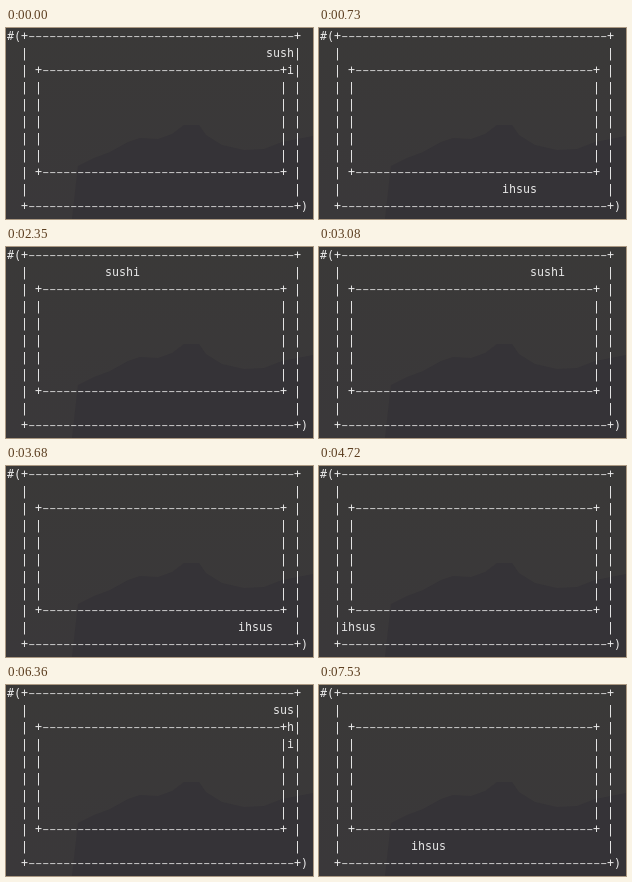
These frames come from a looping animation (307x191 px, 7830 ms). An HTML page:

```html
<!DOCTYPE html>
<html lang="en">
<head>
<meta charset="utf-8">
<title>Sushi belt</title>
<style>
html, body { margin: 0; width: 100%; height: 100%; overflow: hidden; background: #3a3839; }
svg { display: block; width: 100%; height: 100%; }
text { font: 11.63px "DejaVu Sans Mono", monospace; fill: #e8e8e8; text-anchor: middle; }
text.dash { font-size: 10px; }
</style>
</head>
<body>
<svg id="stage" viewBox="0 0 307 191">
  <defs>
    <linearGradient id="sky" x2="0" y2="1">
      <stop offset="0" stop-color="#3a3938"/>
      <stop offset="1" stop-color="#3a383a"/>
    </linearGradient>
  </defs>
  <rect width="307" height="191" fill="url(#sky)"/>
  <path fill="#353337" d="M66 191 72 138 88 130 104 124 122 114 134 110 152 111 166 106 178 97 193 97 200 107 216 117 238 122 258 121 276 114 307 108V191Z"/>
</svg>
<script>
const CELL_W = 7, CELL_H = 17;
const WORD = 'sushi';
const LOOP = 7830;
const RING = 90;
const stage = document.getElementById('stage');

const cellX = col => 4.5 + CELL_W * col;
const baseline = row => 12 + CELL_H * row;

function addText(string, cols, y, className = '') {
  const el = document.createElementNS('http://www.w3.org/2000/svg', 'text');
  el.setAttribute('x', cols.map(cellX).join(' '));
  el.setAttribute('y', y);
  el.setAttribute('class', className);
  el.textContent = string;
  stage.append(el);
  return el;
}

function drawBox(left, top, right, bottom) {
  const inner = Array.from({ length: right - left - 1 }, (_, i) => left + 1 + i);
  for (const row of [top, bottom]) {
    addText('++', [left, right], baseline(row));
    addText('\u2212'.repeat(inner.length), inner, baseline(row) - 0.36, 'dash');
  }
  for (let row = top + 1; row < bottom; row++) {
    addText('||', [left, right], baseline(row) - 0.5);
  }
}

// Clockwise walk through the corridor between the two boxes.
function cellAt(index) {
  const p = index % RING;
  if (p < 38) return [3 + p, 1];
  if (p < 45) return [40, p - 36];
  if (p < 83) return [85 - p, 9];
  return [3, 91 - p];
}

// [step, start in ms, cell of the first letter]
const KEYS = [
  [0, 0, 34], [1, 140, 38], [8, 1180, 67], [9, 1320, 72], [16, 2350, 101],
  [17, 2500, 105], [24, 3530, 134], [25, 3680, 138], [32, 4720, 168],
  [33, 4870, 172], [40, 5910, 202], [41, 6060, 206], [43, 6360, 215],
  [48, 7090, 236], [49, 7240, 240], [51, 7530, 248]
];

const steps = [];
KEYS.slice(1).forEach(([end, endTime, endCell], i) => {
  const [start, time, cell] = KEYS[i];
  for (let n = start; n < end; n++) {
    const k = (n - start) / (end - start);
    steps.push({
      time: Math.round((time + (endTime - time) * k) / 10) * 10,
      cell: Math.round(cell + (endCell - cell) * k)
    });
  }
});
const [, lastTime, lastCell] = KEYS[KEYS.length - 1];
steps.push({ time: lastTime, cell: lastCell });

addText('#(', [0, 1], baseline(0));
addText(')', [42], baseline(10));
drawBox(2, 0, 41, 10);
drawBox(4, 2, 39, 8);
const letters = [...WORD].map(char => addText(char, [0], 0));

function render(ms) {
  const t = ms % LOOP;
  const { cell } = steps.findLast(step => step.time <= t);
  letters.forEach((letter, i) => {
    const [col, row] = cellAt(cell + i);
    letter.setAttribute('x', cellX(col));
    letter.setAttribute('y', baseline(row));
  });
}

const origin = performance.now();
function tick() {
  render(performance.now() - origin);
  requestAnimationFrame(tick);
}
tick();
</script>
</body>
</html>
```
